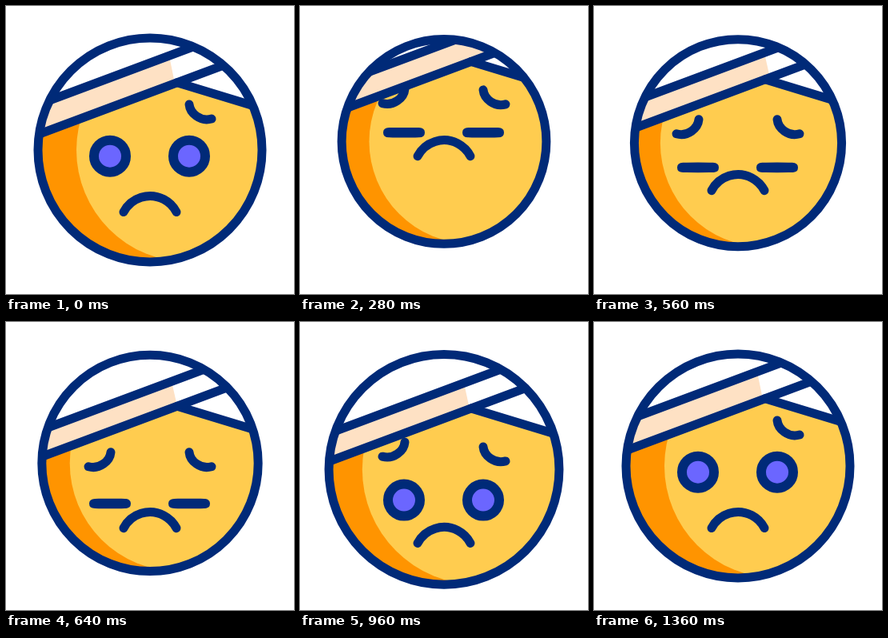
Recreate the animation shown at these times as an HTML page with a canvas. Size 360 by 360 pixels, loop 2 s.

```html
<!DOCTYPE html>
<html lang="en">
<head>
<meta charset="utf-8">
<title>Bandaged face</title>
<style>
  html, body { margin: 0; width: 100%; height: 100%; overflow: hidden; background: #fff; }
  canvas { display: block; width: 360px; height: 360px; }
</style>
</head>
<body>
<canvas id="stage"></canvas>
<script>
const LOOP = 2000, STEP = 40;
const NAVY = '#002a78', YELLOW = '#ffcc4f', ORANGE = '#ff9400';
const CREAM = '#fee1c4', VIOLET = '#6b66ff';

const canvas = document.getElementById('stage');
const ctx = canvas.getContext('2d');
const ratio = window.devicePixelRatio || 1;
canvas.width = canvas.height = 360 * ratio;
ctx.scale(ratio, ratio);
ctx.lineCap = ctx.lineJoin = 'round';

// Smoothly eased value at time t from [time, value] keys.
function track(t, ...keys) {
  const i = keys.findIndex(k => k[0] > t);
  if (i < 0) return keys[keys.length - 1][1];
  const [t0, a] = keys[i - 1], [t1, b] = keys[i];
  const p = (t - t0) / (t1 - t0);
  return a + (b - a) * p * p * (3 - 2 * p);
}

// Features look up, down and back to rest.
const nod = (t, up, down, rest = 0, end = 1170) =>
  track(t, [0, rest], [345, up], [780, down], [end, rest]);

// The head shrinks, grows and settles a little later than the features.
const swell = (t, rest, small, large) =>
  track(t, [0, rest], [412, small], [855, large], [1160, rest]);

function disc(x, y, r) {
  ctx.beginPath();
  ctx.arc(x, y, r, 0, Math.PI * 2);
}

function shape(fill, ...points) {
  ctx.beginPath();
  points.forEach(([x, y]) => ctx.lineTo(x, y));
  ctx.fillStyle = fill;
  ctx.fill();
}

function stroke(width = 11) {
  ctx.lineWidth = width;
  ctx.strokeStyle = NAVY;
  ctx.stroke();
}

function line(from, to) {
  ctx.beginPath();
  ctx.moveTo(...from);
  ctx.lineTo(...to);
  stroke();
}

function brow(side, dy) {
  const x = d => 180 + side * d;
  ctx.beginPath();
  ctx.moveTo(x(49), 123 + dy);
  ctx.bezierCurveTo(x(50), 134 + dy, x(63), 145 + dy, x(77), 141 + dy);
  stroke();
}

function bandage(t) {
  const strip = y => x => [x, y - 0.373 * (x - 140)];
  const top = strip(86 + nod(t, -26, 26));
  const low = strip(123.3 + nod(t, -29, 22));
  const knot = low(214);
  const back = [360, knot[1] + 0.305 * 146];
  const edge = track(t, [0, 207], [300, 252], [640, 210], [1160, 207]);

  shape('#fff', [0, 0], low(0), knot, back, [360, 0]);
  shape(CREAM, top(0), top(edge - 3), low(edge + 4), low(0));
  line(knot, back);
  line(top(0), top(360));
  line(low(0), low(360));
}

function eye(x, y, ry) {
  ctx.beginPath();
  ctx.ellipse(x, y, 20, ry, 0, 0, Math.PI * 2);
  ctx.fillStyle = VIOLET;
  ctx.fill();
  stroke(12);
}

function mouth(y) {
  const r = 37.2, spread = Math.asin(33 / r), up = -Math.PI / 2;
  ctx.beginPath();
  ctx.arc(180, y + r, r, up - spread, up + spread);
  stroke();
}

function draw(t) {
  const r = swell(t, 140, 124, 145.4), cy = swell(t, 180, 166, 186);

  ctx.fillStyle = '#fff';
  ctx.fillRect(0, 0, 360, 360);

  ctx.save();
  disc(180, cy, r);
  ctx.clip();
  ctx.fillStyle = ORANGE;
  ctx.fillRect(0, 0, 360, 360);
  disc(swell(t, 88, 86, 74) + r, cy, r);
  ctx.fillStyle = YELLOW;
  ctx.fill();
  brow(1, nod(t, -20, 59));
  brow(-1, nod(t, -20, 59, -13));
  bandage(t);
  ctx.restore();

  const open = track(t, [0, 20], [260, 0.3], [700, 0.3], [960, 20]);
  const eyeY = 187.7 + nod(t, -32.5, 62.5);
  eye(130, eyeY, open);
  eye(229, eyeY, open);
  mouth(237.5 + nod(t, -77, 25, 0, 1340));

  disc(180, cy, r);
  stroke();
}

function frame() {
  const t = performance.now() % LOOP;
  draw(Math.floor(t / STEP) * STEP);
  requestAnimationFrame(frame);
}
frame();
</script>
</body>
</html>
```
